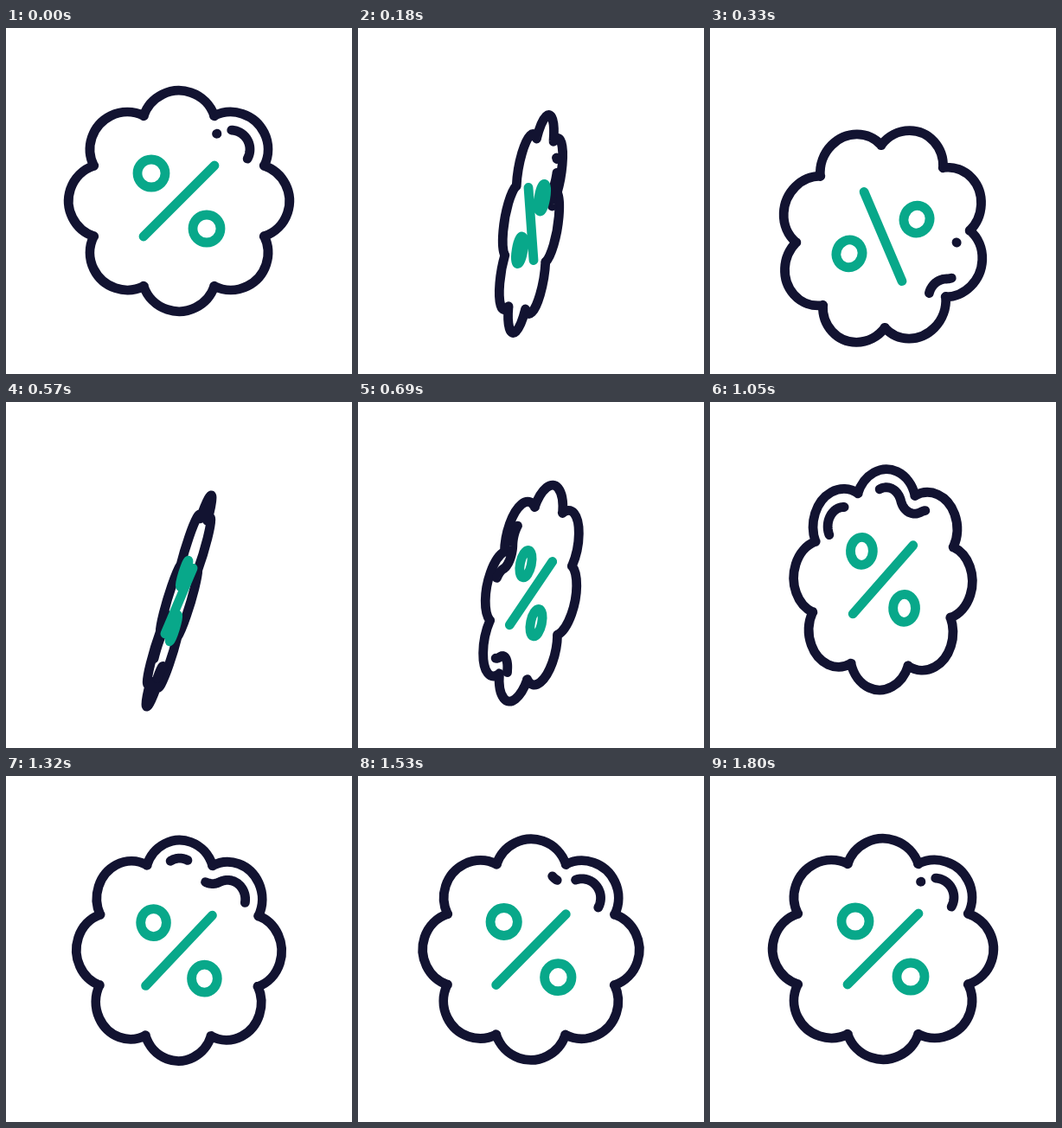
These frames come from a looping animation (400 px wide and 400 px high, 1.83 s). An HTML page with a canvas:

```html
<!DOCTYPE html>
<html lang="en">
<head>
<meta charset="utf-8">
<title>Discount badge</title>
<style>
  html, body { margin: 0; width: 100%; height: 100%; overflow: hidden; background: #fff; }
  canvas { display: block; width: 400px; height: 400px; }
</style>
</head>
<body>
<canvas id="stage" width="400" height="400"></canvas>
<script>
const ctx = document.getElementById('stage').getContext('2d');
const DARK = '#121331', GREEN = '#08a88a';
const STEP = 30, STEPS = 61, LAST = 60;
const DEG = Math.PI / 180, SLICE = 45 * DEG;

// Badge: eight lobes; the shine runs on a parallel curve inside the outline.
const LOBE_R = 43.2, LOBE_DIST = 84.5, NOTCH_DIST = 106.7, LOBE_HALF = 71.5 * DEG;
const INSET = 21, SHINE_R = LOBE_R - INSET;
const LOBE_LEN = 2 * LOBE_HALF * SHINE_R;
const PERIOD = LOBE_LEN + (2 * LOBE_HALF - SLICE) * INSET;

// Keys as [step, value]
const FLIP = [[0, 0], [3, 53], [6, 104], [11, 201], [19, 276], [28, 307.3], [36, 326], [44, 338.3], [54, 353], [60, 360]];
const DROP = [[0, 0], [2, 4], [6, 26.5], [10, 40], [12, 40.3], [19, 30], [28, 10.7], [36, 4.8], [44, 1.8], [52, 0.5], [60, 0]];
const TILT = [[0, 0], [3, 2.5], [6, 9.5], [9, 16.8], [11, 20], [13, 20.8], [19, 17], [28, 5.8], [36, 2], [44, 0.5], [60, 0]];

// Smooth curve through the keys
function track(keys, x) {
  const n = keys.length - 1;
  const slope = i => {
    const [a, b] = [keys[Math.max(i - 1, 0)], keys[Math.min(i + 1, n)]];
    return (b[1] - a[1]) / (b[0] - a[0]);
  };
  let i = 0;
  while (i < n - 1 && x > keys[i + 1][0]) i++;
  const [x0, y0] = keys[i], [x1, y1] = keys[i + 1], w = x1 - x0, t = (x - x0) / w;
  const h = t * t * (3 - 2 * t);
  return y0 + (y1 - y0) * h
    + w * t * (1 - t) * ((1 - t) * slope(i) - t * slope(i + 1));
}

// Cubic ease with handles (x1, 0) and (x2, 1)
function ease(x1, x2, x) {
  if (x >= 1) return 1;
  let lo = 0, hi = 1;
  for (let i = 0; i < 30; i++) {
    const m = (lo + hi) / 2, r = 1 - m;
    if (3 * x1 * m * r * r + 3 * x2 * m * m * r + m * m * m < x) lo = m; else hi = m;
  }
  return lo * lo * (3 - 2 * lo);
}

const polar = (r, a) => [r * Math.cos(a), r * Math.sin(a)];
const lobeAngle = k => k * SLICE - Math.PI / 2;

// Point on the shine curve; one unit is one lobe, zero is the top, clockwise
function shinePoint(u) {
  const k = Math.round(u), along = (u - k) * PERIOD;
  let base, arm;
  if (Math.abs(along) <= LOBE_LEN / 2) {
    base = polar(LOBE_DIST, lobeAngle(k));
    arm = polar(SHINE_R, lobeAngle(k) + along / SHINE_R);
  } else {
    const mid = Math.floor(u) + 0.5, a = lobeAngle(mid);
    base = polar(NOTCH_DIST, a);
    arm = polar(INSET, a + Math.PI - (u - mid) * PERIOD / INSET);
  }
  return [base[0] + arm[0], base[1] + arm[1]];
}

function shine(from, to) {
  const n = 40;
  if (Math.abs(to - from) < 0.004) to = from + 0.004;
  for (let i = 0; i <= n; i++) {
    const p = shinePoint(from + (to - from) * i / n);
    i ? ctx.lineTo(...p) : ctx.moveTo(...p);
  }
}

function outline() {
  for (let k = 0; k < 8; k++) {
    const a = lobeAngle(k);
    ctx.arc(...polar(LOBE_DIST, a), LOBE_R, a - LOBE_HALF, a + LOBE_HALF);
  }
  ctx.closePath();
}

function percent() {
  ctx.moveTo(-41, 41);
  ctx.lineTo(41, -41);
  for (const c of [-32, 32]) {
    ctx.moveTo(c + 16, c);
    ctx.arc(c, c, 16, 0, 2 * Math.PI);
    ctx.closePath();
  }
}

function draw(step) {
  const squeeze = Math.cos(track(FLIP, step) * DEG);
  const tilt = track(TILT, step) * DEG, drop = track(DROP, step), t = step / LAST;

  // The path is squeezed, the stroke keeps its weight.
  const stroke = (color, sx, path) => {
    ctx.save();
    ctx.translate(200, 200 + drop);
    ctx.rotate(tilt);
    ctx.scale(sx, 1);
    ctx.beginPath();
    path();
    ctx.restore();
    ctx.strokeStyle = color;
    ctx.stroke();
  };

  ctx.fillStyle = '#fff';
  ctx.fillRect(0, 0, 400, 400);
  ctx.lineWidth = 10.8;
  ctx.lineCap = ctx.lineJoin = 'round';
  const lit = Math.abs(squeeze);
  stroke(DARK, squeeze, outline);
  stroke(DARK, lit, () => shine(0.62 + 8 * ease(0.288, 0.471, t), 0.62 + 8 * ease(0.33, 0.326, t)));
  stroke(DARK, lit, () => shine(0.82 + 8 * ease(0.325, 0.154, t), 1.32 + 8 * ease(0.4, 0.2, step / 51)));
  stroke(GREEN, squeeze, percent);
}

function tick() {
  draw(Math.floor(performance.now() / STEP) % STEPS);
  requestAnimationFrame(tick);
}
tick();
</script>
</body>
</html>
```
